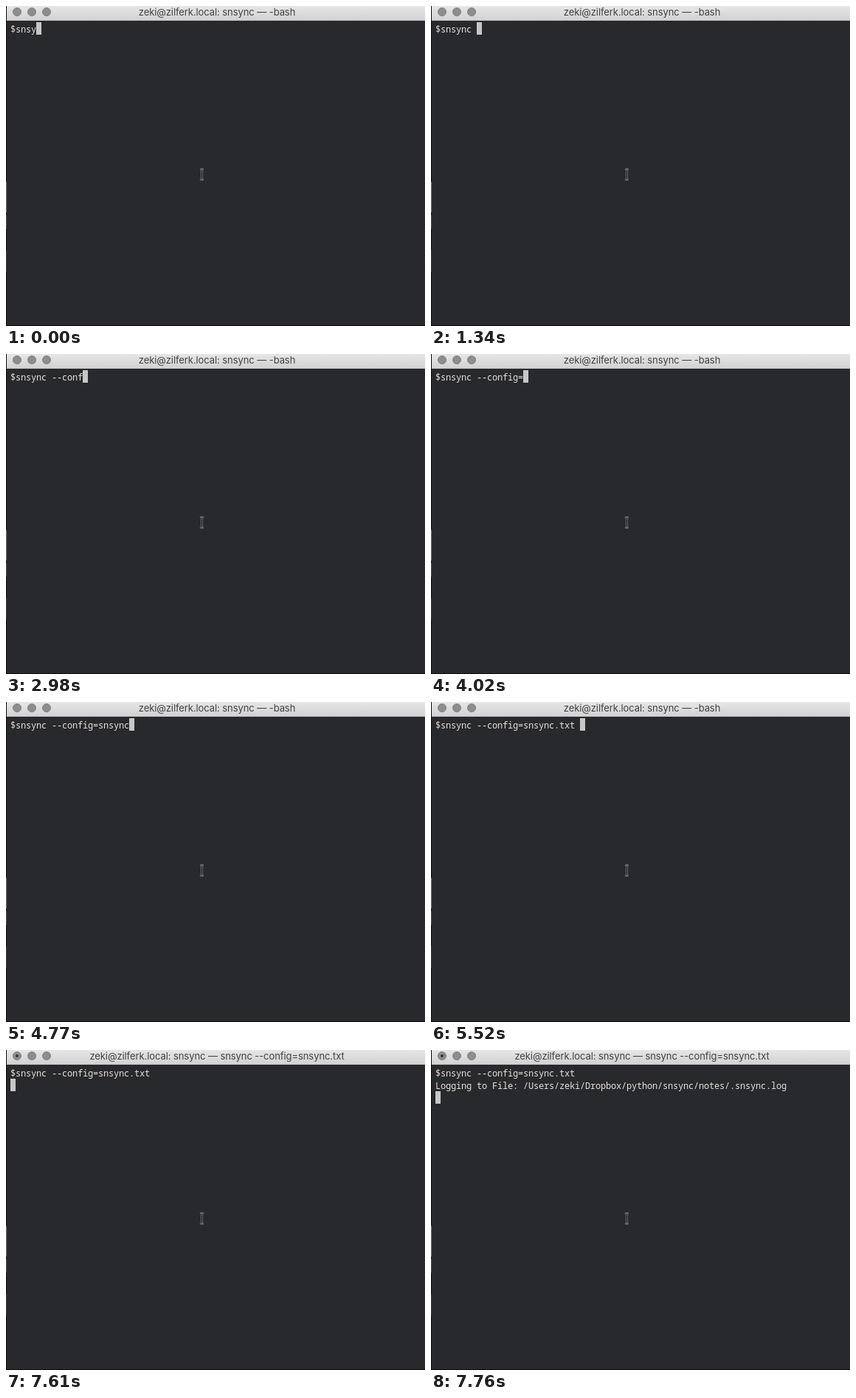
These frames come from a looping animation (568 by 435 pixels, 8000 ms). An HTML page:

```html
<!DOCTYPE html>
<html lang="en">
<head>
<meta charset="utf-8">
<title>Terminal</title>
<style>
  html, body { margin: 0; width: 100%; height: 100%; overflow: hidden; background: #28292c; }
  .stage { position: relative; width: 568px; height: 435px; overflow: hidden; background: #28292c; }
  .stage > * { position: absolute; }

  .bar {
    left: 1px; top: 0; width: 567px; height: 19px;
    background: linear-gradient(#e6e6e6, #d2d2d2);
    border-bottom: 1px solid #c4c4c4;
  }
  .title {
    left: 2px; top: 0; width: 568px; height: 17px;
    font: 13px/17px Inter, "Open Sans", sans-serif;
    letter-spacing: -0.08px;
    font-variant-ligatures: none;
    text-align: center; white-space: pre; color: #414141;
  }
  .art { left: 0; top: 0; }

  .line, .log {
    left: 6px; height: 17px;
    font: 12px/17px "Noto Sans Mono", monospace;
    font-variant-ligatures: none;
    letter-spacing: -0.2px; white-space: pre; color: #e6e3da;
  }
  .line { top: 22px; width: 35px; }
  .line b { font-weight: inherit; color: #ecd6c8; }
  .log { top: 40px; }
  .typed { position: absolute; top: 1px; width: 100%; height: 17px; overflow: hidden; }
  .caret { position: absolute; left: 100%; top: 0; width: 7px; height: 17px; background: #c5c8c6; }

  .line, .caret, .idle, .busy, .log { animation: 8s step-end infinite; }
  .line { animation-name: type; }
  .caret { animation-name: newline; }
  .idle { animation-name: hide; }
  .busy { animation-name: show; visibility: hidden; }
  .log { animation-name: output; visibility: hidden; }

  /* one column is 7px wide */
  @keyframes type {
    0% { width: 35px; }
    9.375% { width: 49px; }
    16.75% { width: 56px; }
    31.75% { width: 63px; }
    33.5% { width: 77px; }
    35.375% { width: 91px; }
    37.25% { width: 98px; }
    39% { width: 105px; }
    40.875% { width: 112px; }
    50.25% { width: 119px; }
    54% { width: 126px; }
    55.875% { width: 140px; }
    59.625% { width: 161px; }
    67.125% { width: 168px; }
    69%, 100% { width: 196px; }
  }
  @keyframes newline {
    0% { left: 100%; top: 0; }
    93.25% { left: 0; top: 17px; }
    97%, 100% { left: 0; top: 34px; }
  }
  @keyframes hide {
    0% { visibility: visible; }
    95.125%, 100% { visibility: hidden; }
  }
  @keyframes show {
    0% { visibility: hidden; }
    95.125%, 100% { visibility: visible; }
  }
  @keyframes output {
    0% { visibility: hidden; }
    97%, 100% { visibility: visible; }
  }
</style>
</head>
<body>
<div class="stage">
  <div class="bar"></div>
  <div class="title idle">zeki@zilferk.local: snsync — -bash</div>
  <div class="title busy">zeki@zilferk.local: snsync — snsync --config=snsync.txt</div>

  <svg class="art" width="568" height="435">
    <defs>
      <path id="beam" d="M263 221.5q2.5 .5 2.5 3v9q0 2.500 -2.500 3M268 221.500q-2.500 .5 -2.500 3M265.500 233.500q0 2.500 2.500 3"/>
    </defs>
    <g fill="#8d8d8d" stroke="#808080">
      <circle cx="15" cy="8" r="5.5"/>
      <circle cx="35" cy="8" r="5.5"/>
      <circle cx="55" cy="8" r="5.5"/>
    </g>
    <circle class="busy" cx="15" cy="8" r="2" fill="#353535"/>

    <!-- window edge -->
    <path d="M0 0h1v435h-1z M0 434h568v1h-568z" fill="#0b0b0c"/>
    <path d="M0 239h1v42h-1z" fill="#6c6c6a"/>
    <path d="M0 284h1v19h-1z" fill="#4d4b45"/>
    <path d="M0 332h1v29h-1z" fill="#35363a"/>

    <!-- text pointer: dark core with a light rim -->
    <g fill="none">
      <use href="#beam" stroke="#b4b4b4" stroke-width="2"/>
      <use href="#beam" stroke="#0c0c0d"/>
    </g>
  </svg>

  <div class="line"><span class="typed"><b>$</b>snsync --config=snsync.txt </span><i class="caret"></i></div>
  <div class="log">Logging to File: /Users/zeki/Dropbox/python/snsync/notes/.snsync.log</div>
</div>
</body>
</html>
```
